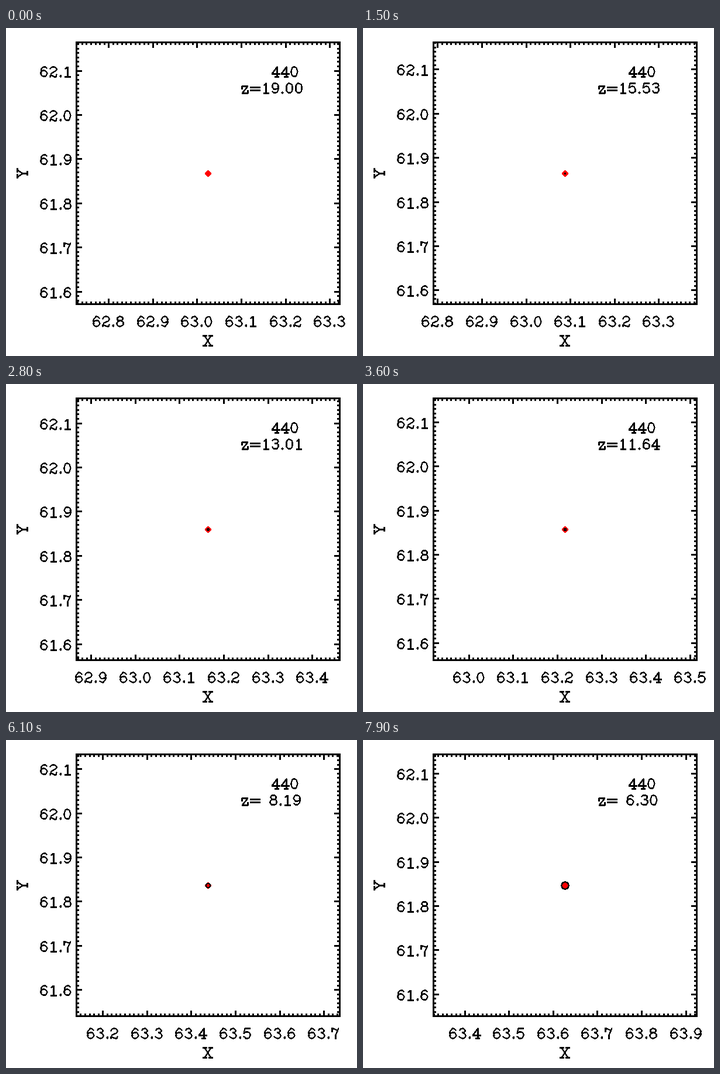
Write a matplotlib script that moves like this. It is 600 px wide and 560 px high and loops after 8000 ms.

```python
import numpy as np
import matplotlib.pyplot as plt
from matplotlib.animation import FuncAnimation
from matplotlib.collections import LineCollection
from matplotlib.patches import Circle, Polygon, Rectangle

W, H, DPI = 600, 560, 100
FRAMES, STEP = 80, 100
PX = 72 / DPI                                   # one pixel in points
LEFT, RIGHT, TOP, BOTTOM = 120.5, 570.5, 24.5, 471.5
MID_X, MID_Y = (LEFT + RIGHT) / 2, (TOP + BOTTOM) / 2
SCALE_X, SCALE_Y = 756, 754                     # pixels per data unit
UNIT = 0.8                                      # pixels per glyph unit

# Key points of the path: step, redshift, x, y
STEPS, KEY_Z, KEY_X, KEY_Y = np.array([
    (0, 19.00, 63.0246, 61.868),
    (15, 15.53, 63.0877, 61.865),
    (28, 13.01, 63.1643, 61.860),
    (36, 11.64, 63.2173, 61.8576),
    (49, 9.71, 63.3246, 61.840),
    (61, 8.19, 63.4378, 61.837),
    (79, 6.30, 63.6266, 61.847),
]).T


# --- stroke lettering: baseline at y=0, cap height 21, x centred ---
def line(*v):
    return np.array(v, float).reshape(-1, 2)


def arc(x, y, rx, ry, start=0, end=360):
    t = np.radians(np.linspace(start, end, 3 + abs(end - start) // 24))
    return np.column_stack([x + rx * np.cos(t), y + ry * np.sin(t)])


def bar(x0, x1, y):
    return line(x0, y, x1, y)


def chain(*parts):
    return np.vstack(parts)


SIX = [arc(0, 6.5, 6.5, 6.5), arc(0.5, 10.5, 7, 10.5, 45, 205)]

# character: (width, strokes)
GLYPHS = {
    " ": (16, []),
    "0": (20, [arc(0, 10.5, 6.5, 10.5)]),
    "1": (20, [line(-4, 17, 0, 21, 0, 0), bar(-4, 5, 0)]),
    "2": (20, [chain(arc(0, 15.5, 6.5, 5.5, 170, -50), line(-5, 7, -7, 0)),
               line(-7, 2, -4, 3, 2, 0, 5, 0, 7, 4)]),
    "3": (20, [arc(0, 16.5, 6, 4.5, 160, -90), arc(0, 6, 7, 6, 90, -160)]),
    "4": (20, [line(3, 0, 3, 21, -8, 6, 8, 6), bar(-1, 6, 0)]),
    "5": (20, [chain(line(5, 21, -5, 21, -7, 11), arc(0, 7, 7, 7, 140, -155))]),
    "6": (20, SIX),
    "7": (20, [line(-7, 15, -7, 21),
               line(-7, 17, -4, 21, 3, 18, 6, 19, 7, 21, 1, 8, 0, 0)]),
    "8": (20, [arc(0, 16.5, 6, 4.5), arc(0, 6, 7, 6)]),
    "9": (20, [np.array([0, 21]) - s for s in SIX]),
    ".": (10, [line(0, 2, -1, 1, 0, 0, 1, 1, 0, 2)]),
    "=": (26, [bar(-9, 9, 12), bar(-9, 9, 6)]),
    "z": (18, [line(-6, 10, -6, 14, 6, 14, -6, 0, 6, 0, 6, 4)]),
    "X": (20, [line(-7, 21, 7, 0), line(7, 21, -7, 0)]
          + [bar(x, x + 6, y) for x in (-9, 3) for y in (0, 21)]),
    "Y": (21, [line(-7, 21, 0, 10, 0, 0), line(8, 21, 0, 10),
               bar(-9, -3, 21), bar(4, 10, 21), bar(-3, 4, 0)]),
}


def snap(v):
    return np.floor(v) + 0.5


def write(text, x, y, align=0.0, upright=True):
    """Strokes of a text; align is the share of its width left of x."""
    pen = -align * sum(GLYPHS[c][0] for c in text)
    out = []
    for c in text:
        width, strokes = GLYPHS[c]
        for s in strokes:
            along, rise = (s[:, 0] + pen + width / 2) * UNIT, s[:, 1] * UNIT
            if upright:
                pts = np.column_stack([x + along, y - rise])
            else:
                pts = np.column_stack([x - rise, y - along])
            out.append(snap(pts))
        pen += width
    return out


# --- stage ---
fig = plt.figure(figsize=(W / DPI, H / DPI), dpi=DPI, facecolor="white")
ax = fig.add_axes([0, 0, 1, 1])
ax.set_xlim(0, W)
ax.set_ylim(H, 0)
ax.axis("off")


def strokes_layer(width, cap):
    layer = LineCollection([], colors="black", linewidths=width * PX,
                           capstyle=cap, antialiaseds=False, snap=False)
    ax.add_collection(layer, autolim=False)
    return layer


ticks = strokes_layer(3, "butt")
letters = strokes_layer(1.1, "projecting")
ax.add_patch(Rectangle((LEFT, TOP), RIGHT - LEFT, BOTTOM - TOP, fill=False,
                       ec="black", lw=3 * PX, joinstyle="miter",
                       antialiased=False, snap=False))

cx, cy, half = snap(MID_X), snap(MID_Y), 5.5
ax.add_patch(Polygon([(cx - half, cy), (cx, cy - half), (cx + half, cy), (cx, cy + half)],
                     fc="red", ec="none", antialiased=False, snap=False, zorder=3))
halo = Circle((cx, cy), 0, fill=False, ec="black", lw=1.1 * PX,
              antialiased=False, snap=False, zorder=4)
ax.add_patch(halo)

FIXED = (write("440", 452.9, 83) + write("X", 345, 542, 0.5)
         + write("Y", 36, 248.5, 0.5, upright=False))


def axis_steps(mid, reach):
    """Hundredths in view: value, tick length and whether it is labelled."""
    for i in range(int(np.ceil((mid - reach) * 100)), int((mid + reach) * 100) + 1):
        major = i % 10 == 0
        yield i / 100, 9 if major else 4.5, major


def draw(n):
    growth = np.interp(n, STEPS, -np.log(1 + KEY_Z))
    a = np.exp(growth)
    x = np.interp(a, 1 / (1 + KEY_Z), KEY_X)
    y = np.interp(a, 1 / (1 + KEY_Z), KEY_Y)

    marks = []
    strokes = FIXED + write(f"z={1 / a - 1:5.2f}", 401.1, 111)
    for value, size, major in axis_steps(x, (RIGHT - LEFT) / 2 / SCALE_X):
        px = snap(MID_X + (value - x) * SCALE_X)
        marks += [[(px, BOTTOM), (px, BOTTOM - size)], [(px, TOP), (px, TOP + size)]]
        if major:
            strokes += write(f"{value:.1f}", px - 0.5, 509.5, 0.5)
    for value, size, major in axis_steps(y, (BOTTOM - TOP) / 2 / SCALE_Y):
        py = snap(MID_Y - (value - y) * SCALE_Y)
        marks += [[(LEFT, py), (LEFT + size, py)], [(RIGHT, py), (RIGHT - size, py)]]
        if major:
            strokes += write(f"{value:.1f}", 113.1, py + 9.5, 1)

    ticks.set_segments(marks)
    letters.set_segments(strokes)
    radius = 6.1 * (a / 0.137) ** 2.4
    halo.set_radius(radius)
    halo.set_visible(radius > 0.65)
    return ticks, letters, halo


anim = FuncAnimation(fig, draw, frames=FRAMES, interval=STEP,
                     repeat=True, repeat_delay=0, blit=False)
plt.show()
```
